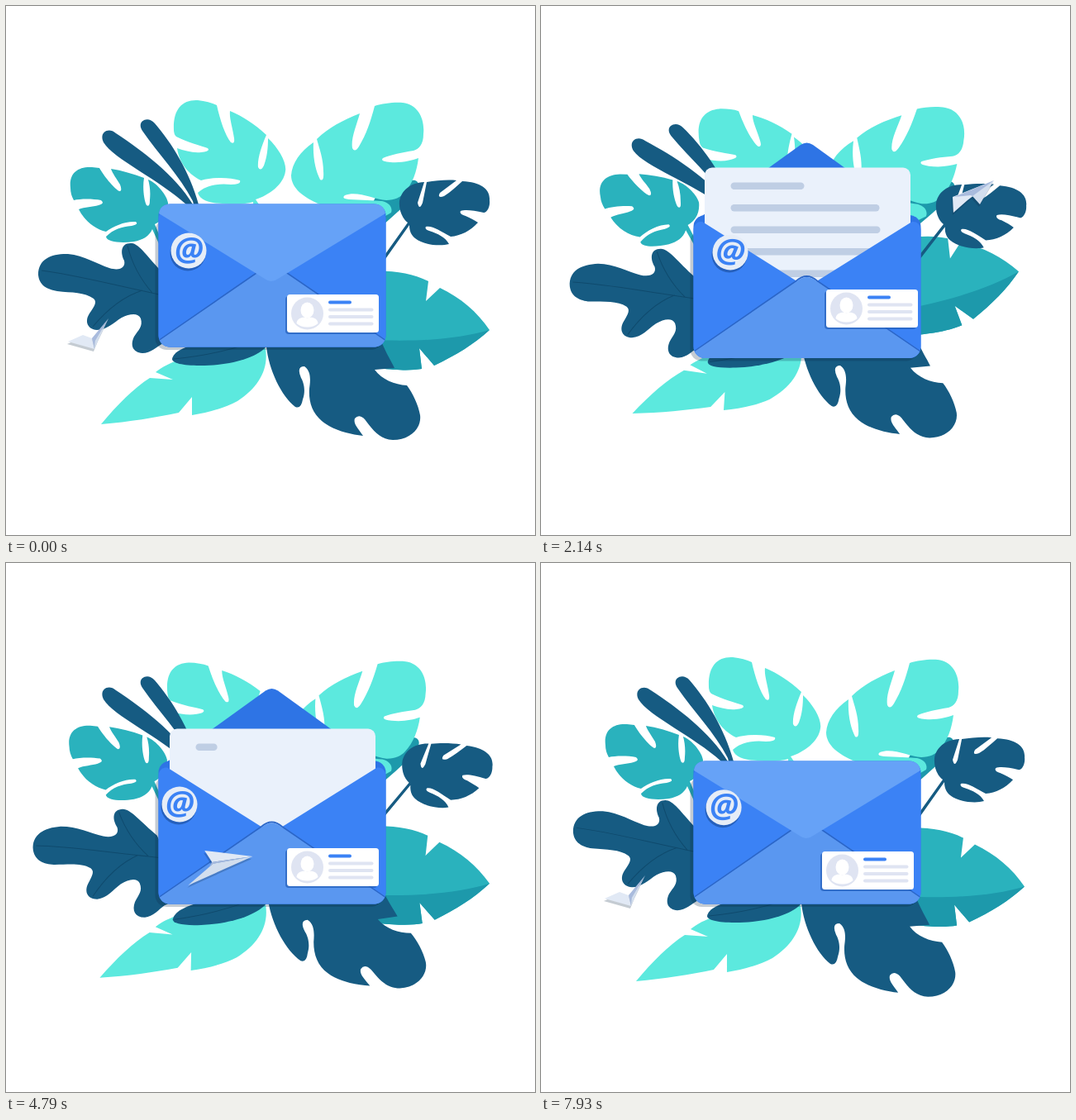
Write an HTML page that moves like this. It is 640 px wide and 640 px high and loops after 8 s.

```html
<!DOCTYPE html>
<html lang="en">
<head>
<meta charset="utf-8">
<title>Mail</title>
<style>
  html, body { margin: 0; width: 100%; height: 100%; overflow: hidden; background: #fff; }
  svg { display: block; width: 100%; height: 100%; }
  .mint { fill: #5ce9de; }
  .teal { fill: #2ab2bd; }
  .sea { fill: #1d99ab; }
  .navy { fill: #165b82; }
  .vein { fill: none; stroke: #0f4a6d; stroke-width: 1; }
  .blue { fill: #3b82f5; }
  .deep { fill: #2e74e5; }
  .shade { fill: #0a2846; opacity: .24; }
  .cast { fill: #2560bd; }
  .line { fill: #bfcee4; }
  .soft { fill: #dfe4f2; }
  .at { font: italic bold 40px "Open Sans", "Noto Sans", sans-serif; fill: #3b82f5; text-anchor: middle; }
</style>
</head>
<body>
<svg viewBox="0 0 640 640">
  <g id="blades" class="sea">
    <path d="M430 275 C450 245 470 222 488 212 C496 208 502 214 498 222 C488 240 462 258 440 280Z"/>
    <path d="M425 275 C440 245 455 213 471 196 C477 191 482 197 480 202 C470 225 450 250 435 280Z"/>
  </g>
  <g id="topLeft" class="mint">
    <path d="M203 150 C202 125 213 113 232 114 C241 115 249 117 255 120 C259 138 265 156 272 165
      Q277 168 276 160 C274 146 270 136 271 127 C286 133 301 143 315 156 C309 170 304 185 305 195
      Q308 201 312 193 C316 182 317 172 317 160 C330 172 340 190 338 200 C336 216 318 229 302 234
      L306 240 L304 262 L300 262 L299 237 C290 240 276 240 262 239 C250 239 235 236 232 226
      C240 218 255 214 272 216 Q285 216 283 211 C270 207 250 207 236 211 C222 204 210 192 207 172
      C216 175 226 178 236 177 Q248 176 244 172 C235 169 220 165 206 158 Q203 155 203 150Z"/>
  </g>
  <g id="topRight" class="mint">
    <path d="M345 205 C346 190 356 176 372 165 C371 185 375 200 380 210 Q385 213 384 200
      C384 185 379 172 376 161 C390 147 408 138 428 130 C424 145 417 160 419 172 Q422 178 427 170
      C436 155 441 140 446 121 C455 118 470 116 480 117 C498 119 507 136 505 155
      C505 167 500 173 493 175 C480 177 465 180 456 184 Q452 188 465 189 C480 190 490 187 499 184
      C497 200 492 215 482 226 C478 231 470 235 460 235 C445 234 425 223 410 229
      Q405 233 415 234 C430 235 445 235 455 236 C464 238 468 244 466 250 L440 265 L390 258
      L380 240 C360 232 345 220 345 205Z"/>
  </g>
  <g id="leftTeal" class="teal">
    <path d="M78 220 C76 203 86 194 104 195 L113 196 C118 205 130 220 137 224 Q141 224 138 216
      C134 209 129 203 127 197 C140 199 154 203 167 208 C165 220 167 235 170 241 Q174 244 174 235
      C175 225 174 217 172 210 C184 215 195 230 196 238 C196 253 188 260 180 264 L190 288 L186 290
      L177 270 C173 279 165 283 155 285 C140 287 122 286 121 279 C130 270 140 267 152 266
      Q161 264 157 261 C145 260 130 266 121 273 C108 270 95 260 88 246 C95 243 105 243 112 241
      Q120 239 115 235 C105 233 90 233 82 235 Q78 228 78 220Z"/>
  </g>
  <g id="fingers" class="navy">
    <path d="M118 165 C112 153 124 146 133 154 C165 175 205 205 226 240 L238 260 L232 260 L218 240 C185 210 130 185 118 165Z"/>
    <path d="M165 151 C157 139 172 132 180 142 C200 165 222 200 233 240 L238 260 L232 260 L226 236 C210 205 185 180 165 151Z"/>
  </g>
  <g id="oak">
    <path class="navy" d="M39 325 C39 306 55 299.500 75 300 C95 302 110 312 125 317 C138 321 145 316 143 308
      C138 298 139 286 152 287 C162 288 172 305 190 323 L215 400 L190 408 C183 412 175 420 165 420
      C153 419 150 410 155 400 C160 392 166 388 163 378 C160 371 150 372 140 377
      C130 383 122 392 110 392 C98 391 95 381 101 372 C108 362 110 358 106 354
      C95 346 80 347 62 345 C50 343 40 338 39 325Z"/>
    <path class="vein" d="M43 320 C85 325 130 338 200 352 M147 290 C152 310 162 330 177 347 M105 388 C120 370 140 352 165 344"/>
  </g>
  <g id="bottomMint" class="mint">
    <path d="M115 506 C135 482 155 462 174 450 L202 452 L181 443 C190 436 198 432 210 428 L300 390
      L314 415 C318 440 305 462 280 478 C265 486 245 492 225 495 L225 473 L209 492 C180 498 150 503 115 506Z"/>
  </g>
  <g id="oval">
    <path class="navy" d="M201 427 C203 418 215 412 240 406 L315 398 L315 412 C305 424 275 435 235 435 C213 435 201 432 201 427Z"/>
    <path class="vein" d="M203 427 C235 424 265 418 295 408"/>
  </g>
  <g id="bigTeal">
    <path class="teal" d="M400 325 C450 317 485 320 511 333 L508 357 L525 341 C550 353 570 370 585 392
      C565 410 545 422 518 435 L500 414 L503 439 C485 442 460 441 400 430Z"/>
    <path class="sea" d="M400 401 C480 408 540 405 585 392 C565 410 545 422 518 435 L500 414 L503 439
      C485 442 460 441 400 430Z"/>
  </g>
  <g id="bigNavy" class="navy">
    <path d="M305 385 L315 412 C318 440 333 472 350 485 Q357 488 359 476 C363 465 360 455 357 450
      Q351 436 361 436 C370 442 368 455 367 463 C366 478 370 492 382 502 C395 513 415 518 432 520
      C425 510 420 505 422 499 Q427 493 434 500 C442 510 450 524 468 525 C490 525 503 510 501 495
      C499 483 492 468 485 459 C470 458 455 452 446 440 L470 438 C465 428 460 420 455 408 L440 370Z"/>
  </g>
  <g id="rightNavy" class="navy">
    <path d="M476 236 C478 224 488 214 506 213 L498 238 Q500 248 504 238 L509 213 C520 211 535 210 545 211
      L525 226 Q521 233 530 230 C538 225 545 218 552 212 C575 213 586 222 585 235
      C586 243 582 250 578 250 C565 247 555 246 550 248 Q548 252 556 254 C562 257 567 259 571 262
      C562 272 550 278 538 279 C525 272 515 265 508 267 Q506 270 512 272 C522 275 532 280 536 288
      C525 291 505 289 495 281 C490 277 488 272 488 265 L457 309 L454 307 L486 262 C479 257 475 246 476 236Z"/>
  </g>
  <g id="planeBack"></g>
  <g id="mail">
    <rect class="shade" x="180.5" y="258" width="275" height="158" rx="14"/>
    <rect class="deep" x="184.5" y="239.5" width="275" height="173" rx="14"/>
    <path id="flapBack" class="deep" d="M190 244 L314 154.5 Q321.500 149.500 329 154.5 L453 244Z"/>
    <g id="letter">
      <rect x="198" y="182" width="249" height="148" rx="9" fill="#eaf1fb"/>
      <g id="lines" class="line"></g>
    </g>
    <path class="blue" d="M184.5 258 C184.5 251 190 246 196 248 L321.500 327 L448 248
      C454 246 459.500 251 459.5 258 V398.500 a14 14 0 0 1 -14 14 H198.500 a14 14 0 0 1 -14 -14Z"/>
    <path d="M186 404 L309 319 Q321.5 308 334 319 L458 404" fill="none" stroke="#2b66c8" stroke-width="2"/>
    <path d="M186 404.500 L309 320 Q321.500 309 334 320 L458 404.500 C456 410 450 412.500 445 412.5 H199
      C193 412.500 188 410 186 404.500Z" fill="#5a97f0"/>
    <path id="flapFront" d="M185 251 L313 330 Q321 336 329 330 L459 251 C458 243 452 239.500 445 239.5 H199
      C192 239.500 186 243 185 251Z" fill="#66a2f7"/>
  </g>
  <g id="card">
    <rect class="cast" x="-2" y="2" width="111" height="46" rx="4" opacity=".75"/>
    <rect width="111" height="46" rx="3.500" fill="#fff"/>
    <circle class="soft" cx="24.500" cy="23" r="19.500"/>
    <ellipse cx="24.500" cy="19" rx="8" ry="9.500" fill="#fff"/>
    <path d="M11.500 35 C12 29 19 26.500 24.500 28.500 C30 26.500 37 29 37.500 35 C31 41 18 41 11.500 35Z" fill="#fff"/>
    <rect class="blue" x="50" y="7.500" width="28" height="4" rx="2"/>
    <rect class="soft" x="50" y="16.500" width="54.500" height="4" rx="2"/>
    <rect class="soft" x="50" y="25" width="54.500" height="4" rx="2"/>
    <rect class="soft" x="50" y="33.500" width="54.500" height="4" rx="2"/>
  </g>
  <g id="badge">
    <circle class="cast" cx="-1" cy="3" r="21.500"/>
    <circle r="21.500" fill="#e6edf7"/>
    <text id="at" class="at" y="12">@</text>
  </g>
  <g id="planeFront"></g>
</svg>
<script>
const LOOP = 8000, HALF = 4000;
const $ = id => document.getElementById(id);
const set = (el, name, value) => el.setAttribute(name, value);
const move = (id, x, y) => set($(id), 'transform', `translate(${x} ${y})`);

function add(parent, tag, attrs) {
  const el = document.createElementNS('http://www.w3.org/2000/svg', tag);
  for (const name in attrs) set(el, name, attrs[name]);
  return parent.appendChild(el);
}

// Smooth periodic curve through [time, value] keys, without overshoot.
function curve(keys, period) {
  const n = keys.length;
  const at = i => {
    const wrap = Math.floor(i / n), [t, v] = keys[i - wrap * n];
    return [t + wrap * period, v];
  };
  const slope = i => {
    const [a, va] = at(i), [b, vb] = at(i + 1);
    return (vb - va) / (b - a);
  };
  const tangent = i => {
    const p = slope(i - 1), q = slope(i);
    return p * q > 0 ? 2 * p * q / (p + q) : 0;
  };
  return time => {
    const t = time % period;
    let i = -1;
    while (i < n - 1 && at(i + 1)[0] <= t) i++;
    const [a, va] = at(i), [b, vb] = at(i + 1), h = b - a, u = (t - a) / h;
    const w = u * u * (3 - 2 * u);
    return va + (vb - va) * w + h * u * (1 - u) * ((1 - u) * tangent(i) - u * tangent(i + 1));
  };
}

const TIMES = [0, 1210, 2140, 3710, 4790, 6710];
const track = (values, period = LOOP) =>
  curve(values.map((v, i) => [TIMES[i] % period, v]).sort((a, b) => a[0] - b[0]), period);

// id, pivot x, pivot y, angle
const leaves = [
  ['blades', 440, 265, track([0, 1.5, 1.5, 0, .5, 1.5], HALF)],
  ['topLeft', 300, 240, track([0, -7.4, -7.8, 0, -5, -5.5], HALF)],
  ['topRight', 400, 250, track([0, 2.5, 4, 0, 1.6, 3.2], HALF)],
  ['leftTeal', 190, 290, track([0, -4.6, -5.4, -.5, -1.2, -5.2])],
  ['fingers', 232, 240, track([0, -5.1, -5, -1.1, 0, -5.3])],
  ['oak', 250, 395, track([0, -7.2, -3.8, -1, -6, -3.8], HALF)],
  ['bottomMint', 315, 430, track([0, 2.9, 3.7, .3, 1.2, 3.2], HALF)],
  ['oval', 310, 410, track([0, -2.6, -2, -.4, -2.3, -1.8], HALF)],
  ['bigTeal', 285, 386, track([0, -11.7, -13.6, -2.9, -.8, -12.4])],
  ['bigNavy', 285, 367, track([0, -7.8, -.8, -7.6, -3.2, -7.8])],
  ['rightNavy', 440, 284, track([0, 7, 2.6, .5, 4.5, -3], HALF)]
];

const bob = curve([[0, 0], [1210, 9.5], [2140, 13.5], [3710, 2.5], [4250, 0], [7930, 0]], LOOP);
const badgeX = track([221, 230, 229, 224, 210, 232]);
const badgeY = track([296, 300, 298, 300, 292, 288]);
const badgeTurn = track([0, 9, 8, 20, 0, 18]);
const cardX = track([340, 341, 345, 338.5, 340, 340]);
const cardY = track([349, 344, 343, 341, 345, 341]);

// Plane: three facets of four corners each.
const shape = text => text.split(' ').map(Number);
const turnLeft = shape('104 402 93 398 75 406 107 415 124 378 104 402 107 415 108 405 124 378 108 405 107 415 112 403');
const cruise = shape('450 284 374 308 400 310 400 310 450 284 400 310 403 322 410 315 450 284 410 315 427 336 427 336');
const shift = (pts, dx, dy, k = 1) => pts.map((v, i) => i % 2 ? v * k + dy : v * k + dx);
const poses = [
  [0, turnLeft],
  [160, shift(turnLeft, -2, 1)],
  [790, shape('298 355 240 348 249 362 249 362 298 355 249 362 246 367 250 364 298 355 250 364 220 390 220 390')],
  [1210, cruise],
  [1680, shift(cruise, 201, -2, .8)],
  [2140, shape('548 211 498 231 499 250 516 235 548 211 500 231 520 229 524 231 548 211 522 230 531 240 531 240')],
  [3710, shape('117 379 103 379 97 381 106 402 150 364 117 379 106 402 117 385 150 364 117 383 106 402 118 387')],
  [3930, shift(turnLeft, 2, 0)]
];
const planePoint = turnLeft.map((_, i) => curve(poses.map(([t, p]) => [t, p[i]]), HALF));

function makePlane(id) {
  const group = $(id);
  const shadow = add(group, 'path', { class: 'shade', transform: 'translate(-1 3)' });
  const facets = ['#e1e9f5', '#a9bbdd', '#d2deee'].map(fill => add(group, 'path', { fill }));
  return { group, shadow, facets };
}
const planes = [makePlane('planeFront'), makePlane('planeBack')];

const lineWidths = [89, 180, 181, 181, 181];
const lines = lineWidths.map((_, i) =>
  add($('lines'), 'rect', { x: 229.5, y: 200 + i * 26.5, height: 8.5, rx: 4.2 }));

const clamp = v => Math.min(1, Math.max(0, v));
const ease = (t, from, to) => (1 - Math.cos(Math.PI * clamp((t - from) / (to - from)))) / 2;

function drawMail(time, p) {
  move('mail', 0, bob(time));
  const open = ease(p, 80, 430) - ease(p, 3270, 3620);
  const fold = Math.cos(Math.PI * open);
  const scale = (id, y, k) =>
    set($(id), 'transform', `translate(0 ${y}) scale(1 ${Math.max(k, 0)}) translate(0 ${-y})`);
  scale('flapFront', 240, fold);
  scale('flapBack', 244, -fold);
  move('letter', 0, 75 * (1 - ease(p, 400, 985) + ease(p, 2850, 3320)));
  lines.forEach((line, i) =>
    set(line, 'width', lineWidths[i] * clamp((p - 747 - i * 150) / 150)));
}

function drawPlane(p) {
  const pts = planePoint.map(f => f(p).toFixed(2));
  const paths = [0, 8, 16].map(i => 'M' + pts.slice(i, i + 8).join(' ') + 'Z');
  planes.forEach(({ group, shadow, facets }, i) => {
    set(group, 'visibility', (p >= 1900) === (i === 1) ? 'visible' : 'hidden');
    set(shadow, 'd', paths.join(''));
    facets.forEach((facet, k) => set(facet, 'd', paths[k]));
  });
}

function draw(now) {
  const time = now % LOOP, p = time % HALF;
  for (const [id, x, y, angle] of leaves) set($(id), 'transform', `rotate(${angle(time)} ${x} ${y})`);
  drawMail(time, p);
  move('card', cardX(time), cardY(time));
  move('badge', badgeX(time), badgeY(time));
  set($('at'), 'transform', `rotate(${badgeTurn(time)})`);
  drawPlane(p);
}

const start = performance.now();
function tick() {
  draw(performance.now() - start);
  requestAnimationFrame(tick);
}
tick();
</script>
</body>
</html>
```
